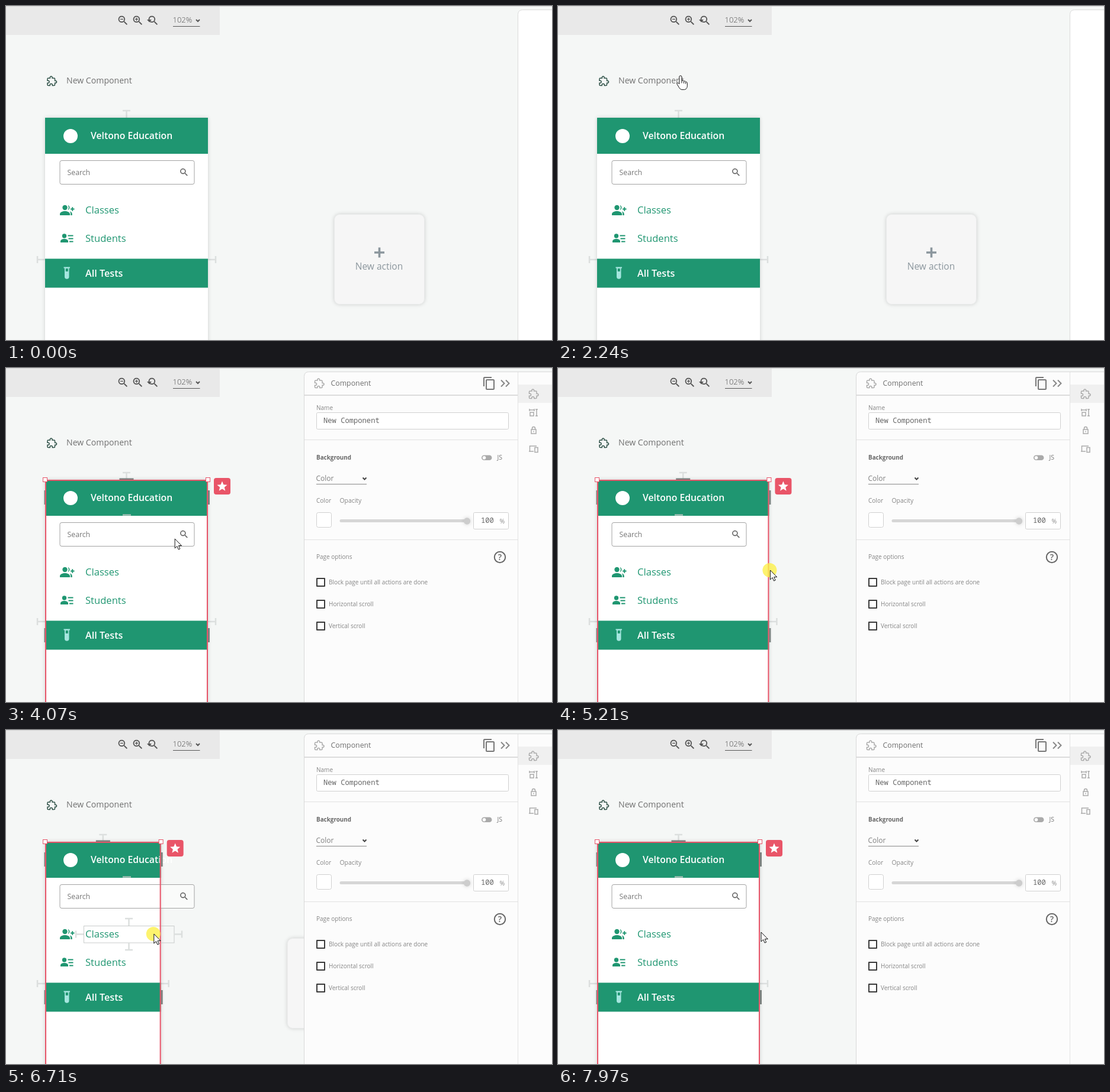
An HTML page for the animation above (8000 ms loop, 922x565 px).

```html
<!DOCTYPE html>
<html lang="en">
<head>
<meta charset="utf-8">
<title>Component resize</title>
<style>
html, body { margin: 0; width: 100%; height: 100%; overflow: hidden; background: #f5f7f6; }
svg { display: block; width: 922px; height: 565px; font-family: "Open Sans", sans-serif; }
.mono { font-family: "Noto Sans Mono", monospace; }
.line { fill: none; stroke: currentColor; }
.guide { fill: none; stroke: #dcdfde; stroke-width: 2.5; }
.rule { stroke: #e2e2e2; }
.box { fill: #fff; stroke: #d0d0d0; }
.green { fill: #1f9671; }
.label { font-size: 10px; font-weight: 500; fill: #858585; }
.menu { font-size: 16.6px; }
.shade { filter: drop-shadow(0 0 3px rgba(0, 0, 0, .16)); }
</style>
</head>
<body>
<svg viewBox="0 0 922 565">
  <defs>
    <path id="glass" d="M15.5 14h-.79l-.28-.27A6.5 6.5 0 1 0 13.73 14.43l.27.28v.79l5 4.99L20.49 19zM9.5 14a4.5 4.5 0 1 1 0-9 4.5 4.5 0 0 1 0 9z" fill-rule="evenodd"/>
    <path id="puzzle" class="line" stroke-width="2" d="M20.5 11H19V7c0-1.1-.9-2-2-2h-4V3.5a2.5 2.5 0 0 0-5 0V5H4c-1.1 0-2 .9-2 2v3.8h1.5a2.7 2.7 0 0 1 0 5.4H2V20c0 1.1.9 2 2 2h3.8v-1.5a2.7 2.7 0 0 1 5.4 0V22H17c1.1 0 2-.9 2-2v-4h1.5a2.5 2.5 0 0 0 0-5z"/>
    <path id="chevron" class="line" stroke-width="2" d="M-3-1.5 0 1.5 3-1.5"/>
  </defs>
  <rect width="922" height="565" fill="#f5f7f6"/>
  <rect width="361" height="49" fill="#e9e9e9"/>
  <path d="M0 .5H922" stroke="#d6d6d6"/>

  <g fill="#555" color="#555">
    <use href="#glass" transform="translate(187 14) scale(.88)"/>
    <use href="#glass" transform="translate(212 14) scale(.88)"/>
    <use href="#glass" transform="translate(238 14) scale(.88)"/>
    <path class="line" stroke-width="1.4" d="M193 22.4h5M218 22.4h5m-2.5-2.5v5"/>
    <path d="M238 23h8l-4 4.5z"/>
    <use href="#chevron" transform="translate(324 24.5)"/>
    <path class="line" d="M282 34.5H327.500"/>
    <text x="281.500" y="28" font-size="13" font-weight="300">102%</text>
  </g>

  <use href="#puzzle" color="#2c4f45" transform="translate(68.500 118.300) scale(.74)"/>
  <text x="102" y="131" font-size="14.1" fill="#707070">New Component</text>

  <g id="card">
    <rect class="shade" x="554.500" y="352.500" width="152" height="152" rx="9" fill="#f6f6f6" stroke="#e9eaea"/>
    <path d="M622 417h17m-8.500-8.500v17" stroke="#8b969d" stroke-width="3.6"/>
    <text x="630" y="446" font-size="15.500" font-weight="500" text-anchor="middle" fill="#8b969d">New action</text>
  </g>

  <path id="frameGuide" class="guide"/>
  <rect id="page" class="shade" x="66" y="189" height="400" fill="#fff"/>
  <rect id="header" class="green" x="66" y="189" height="61"/>
  <rect id="active" class="green" x="66" y="427.500" height="49"/>
  <circle cx="109" cy="220" r="12" fill="#fff"/>
  <text x="143" y="225" font-size="15.750" font-weight="600" fill="#fff">Veltono Education</text>
  <rect x="91" y="261.500" width="227" height="40" rx="3" fill="#fff" fill-opacity=".5" stroke="#a3a3a3"/>
  <text x="103.500" y="286" font-size="12.300" fill="#777">Search</text>
  <use href="#glass" fill="#555" transform="translate(292 272.700) scale(.72)"/>

  <g class="green" color="#1f9671">
    <circle cx="99.500" cy="341" r="4.200"/>
    <path d="M91 354v-2c0-3.500 5-5 8.500-5s8.500 1.500 8.500 5v2zM104.500 337a4.200 4.200 0 0 1 0 8 7 7 0 0 0 0-8zM107.500 347.300c2.500.8 4.200 2.200 4.200 4.700v2h-2.500v-2c0-2-.5-3.500-1.700-4.700z"/>
    <path class="line" stroke-width="2" d="M109 343.500h6.500m-3.250-3.250v6.500"/>
    <circle cx="98.500" cy="389" r="3.700"/>
    <path d="M92 400v-2c0-2.700 3.500-4 6.500-4s6.500 1.300 6.500 4v2z"/>
    <path class="line" stroke-width="2" d="M104.500 388.500h9m-8 5h8m-6.500 5h6.500"/>
    <text class="menu" x="134" y="351">Classes</text>
    <text class="menu" x="134" y="399">Students</text>
  </g>
  <path d="M97.500 441.500h10.500v2h-1.500v15a3.800 3.800 0 0 1-7.500 0v-15h-1.500z" fill="#a5e6df"/>
  <path d="M100.800 444h4v5h-4z" fill="#1f9671"/>
  <text x="134" y="458" font-size="16.200" font-weight="600" fill="#fff">All Tests</text>
  <path id="tick" d="M197 248.500h14" stroke="#b9c4c0" stroke-width="2"/>
  <g id="hover"><rect class="line" color="#c9cccb"/><path class="guide"/></g>

  <g id="selection">
    <path id="bars" fill="none" stroke="#7d8280" stroke-width="3"/>
    <path id="outline" fill="none" stroke="#e75468" stroke-width="2"/>
    <rect x="62.500" y="185.500" width="7" height="7" fill="#fff" stroke="#e75468"/>
    <g id="corner">
      <rect x="-3.500" y="185.500" width="7" height="7" fill="#fff" stroke="#e75468"/>
      <rect x="10" y="186" width="28" height="28" rx="4" fill="#e95568"/>
      <path id="star" fill="#fff"/>
    </g>
  </g>

  <path id="rail" d="M864.500 566V14.500q0-8 8-8H930V566z" fill="#fff" stroke="#dadada"/>
  <g id="panel">
    <path d="M503.500 566V14.500q0-8 8-8H930V566z" fill="#fcfcfc" stroke="#d8d8d8"/>
    <path d="M865 28h57v31h-57z" fill="#f0f0f0"/>
    <path class="rule" d="M864.500 7V565M504 121.500H864M504 290.500H864"/>
    <path d="M504 46H864" stroke="#dcdcdc" stroke-width="2"/>
    <use href="#puzzle" color="#aaa" transform="translate(520 17.300) scale(.74)"/>
    <use href="#puzzle" color="#aaa" transform="translate(882 35.300) scale(.74)"/>
    <g class="line" color="#aaa" stroke-width="1.500">
      <path d="M884 71h8m-8-2v4m8-4v4M885 75h6v6h-6zM896 70v11m-2-11h4m-4 11h4"/>
      <path d="M887 104h8v7h-8zM888.500 104v-2a2.500 2.500 0 0 1 5 0v2M891 106.500v2"/>
      <path d="M891 141h-8M884.500 141v-9H896M893 134.500h5v8h-5z"/>
    </g>
    <text x="548.500" y="30" font-size="12.300" font-weight="500" fill="#707070">Component</text>
    <path transform="translate(804 14)" fill="#777" d="M16 1H4c-1.100 0-2 .9-2 2v14h2V3h12V1zm3 4H8c-1.100 0-2 .9-2 2v14c0 1.100.9 2 2 2h11c1.100 0 2-.9 2-2V7c0-1.100-.9-2-2-2zm0 16H8V7h11v14z"/>
    <path class="line" color="#888" stroke-width="2" d="m836 20.500 5.500 5.500-5.500 5.500m8-11 5.500 5.500-5.500 5.500"/>

    <text class="label" x="524" y="71">Name</text>
    <rect class="box" x="524.500" y="75.500" width="324" height="28" rx="2"/>
    <text class="mono" x="536" y="93" font-size="12.150" fill="#666">New Component</text>

    <text x="524" y="155" font-size="9.900" font-weight="700" fill="#666">Background</text>
    <rect x="803" y="147.500" width="17.500" height="8.500" rx="4.250" fill="#aaa"/>
    <circle cx="807.500" cy="151.700" r="2.800" fill="#fff"/>
    <text x="829.500" y="155" font-size="10.500" fill="#777">JS</text>
    <text x="523.500" y="191" font-size="12" fill="#808080">Color</text>
    <use href="#chevron" color="#444" transform="translate(605.500 187)"/>
    <path d="M524 196.500h85" stroke="#888"/>

    <text class="label" x="524" y="228">Color</text>
    <text class="label" x="563.500" y="228" style="font-size:10.400px">Opacity</text>
    <rect class="box" x="524.500" y="244.500" width="25" height="25" rx="3"/>
    <path d="M566 258.500H778" stroke="#d6d6d6" stroke-width="5" stroke-linecap="round"/>
    <circle class="shade" cx="778.500" cy="259" r="5.700" fill="#cdcdcd"/>
    <rect class="box" x="789.500" y="244.500" width="59" height="28" rx="2"/>
    <text class="mono" x="802" y="262" font-size="12.150" fill="#666">100</text>
    <text x="833.500" y="263" font-size="10.500" fill="#888">%</text>

    <text class="label" x="524" y="323">Page options</text>
    <circle cx="834" cy="320" r="9.200" fill="none" stroke="#666" stroke-width="2"/>
    <text x="834" y="325" font-size="14" font-weight="600" text-anchor="middle" fill="#666">?</text>
    <path fill="#fff" stroke="#3a3a3a" stroke-width="2" stroke-linejoin="round" d="M525 356h13v13h-13zM525 393h13v13h-13zM525 430h13v13h-13z"/>
    <text class="label" x="545" y="366">Block page until all actions are done</text>
    <text class="label" x="545" y="403">Horizontal scroll</text>
    <text class="label" x="545" y="440">Vertical scroll</text>
  </g>

  <g id="cursor" fill="#fff" stroke="#111" stroke-linejoin="round">
    <circle id="press" cx="-1" cy="0" r="12" fill="#fdf04a" fill-opacity=".8" stroke="none"/>
    <path id="arrow" d="M0 0v16l3.700-3.500 2.400 5.600 2.600-1.100-2.400-5.400h5z"/>
    <g id="hand">
      <path d="M-2.200 14V2a2 2 0 0 1 4.200 0v6.500c1-1 3.300-.8 3.600.8 1.200-.8 3 0 3.100 1.200 1.200-.5 2.600.3 2.600 1.800v4.500c0 4-2 6.700-6 6.700h-2.500c-3 0-4.600-2-5.800-4.400l-3-5c-.9-1.600 1.200-3 2.400-1.600z"/>
      <path d="M2 8.500v4M5.600 9.500v3.500M8.700 10.700v3" fill="none"/>
    </g>
  </g>
</svg>
<script>
const LOOP = 8000, LEFT = 66, REST = 341;
const el = id => document.getElementById(id);
const ease = {
  inOut: p => p < .5 ? 4 * p ** 3 : 1 - (2 - 2 * p) ** 3 / 2,
  out: p => 1 - (1 - p) ** 2,
  linear: p => p
};

// Rows are [time, values, easing towards this row]; equal values hold still.
const pointer = [
  [1320, [823, 515]], [2120, [207, 118], 'inOut'],
  [2240, [207, 118]], [3020, [259, 267], 'inOut'],
  [3050, [259, 267]], [3420, [115, 115], 'inOut'],
  [3590, [115, 115]], [4390, [343, 348], 'inOut'],
  [4970, [343, 348]], [5210, [358, 342], 'cubicIn'],
  [5740, [467, 345], 'out'], [5890, [467, 345]],
  [6070, [356, 344], 'linear'], [6660, [252, 345], 'out'],
  [6710, [250, 345]], [6900, [231, 344], 'out'],
  [7070, [231, 344]], [7640, [343, 342], 'inOut']
];
const edge = [
  [4970, [341, 341]], [5210, [356, 356], 'cubicIn'],
  [5740, [465, 465], 'out'], [5890, [465, 465]],
  [6070, [403, 382], 'linear'], [6200, [352, 352], 'linear'],
  [6660, [264, 264], 'out'], [6710, [262, 262]],
  [6900, [231, 231], 'out'], [7070, [231, 231]],
  [7640, [343, 343], 'inOut'], [7890, [343, 343]], [7970, [341, 341]]
];
const press = [[4510, [0]], [4670, [1]], [7890, [1]], [7970, [0]]];
ease.cubicIn = p => p ** 2;

function at(track, t) {
  const i = track.findIndex(row => row[0] > t);
  if (i === 0) return track[0][1];
  if (i < 0) return track[track.length - 1][1];
  const [t0, from] = track[i - 1], [t1, to, name = 'linear'] = track[i];
  const p = ease[name]((t - t0) / (t1 - t0));
  return from.map((v, k) => v + (to[k] - v) * p);
}

const set = (id, name, value) => el(id).setAttribute(name, value);
const show = (id, on) => el(id).style.display = on ? '' : 'none';
const inside = (x, y, [bx, by, w, h]) => x >= bx && x <= bx + w && y >= by && y <= by + h;

function guides(x, y, w, h, bottom = true) {
  const cx = x + w / 2, cy = y + h / 2, r = x + w, b = y + h;
  return `M${x} ${cy}h-13m0-6v12M${r} ${cy}h13m0-6v12M${cx} ${y}v-12m-6.500 0h13`
    + (bottom ? `M${cx} ${b}v12m-6.500 0h13` : '');
}

function hoverBox(t, x, y) {
  const boxes = t > 2120 && t < 3590 ? [[66, 189, 275, 60], [91, 261, 227, 40]]
    : t > 5890 && t < 7640 ? [[131, 331, 153, 29]] : [];
  return boxes.find(box => inside(x, y, box));
}

function draw(t) {
  const [x, y] = at(pointer, t), [right, body] = at(edge, t);
  const selected = t >= 3630, width = right - LEFT, mid = LEFT + width / 2;

  set('page', 'width', body - LEFT);
  set('header', 'width', width);
  set('active', 'width', width);
  set('card', 'transform', `translate(${right - REST} 0)`);
  set('frameGuide', 'd', guides(LEFT, 189, width, 480, false));
  show('tick', t >= 3050);

  show('selection', selected);
  set('outline', 'd', `M67 566V190H${right - 1}V566`);
  const trail = right - body > 12
    ? `M${body} 207v24m0-12H${right}M${body} 440v24m0-12H${right}` : '';
  set('bars', 'd', `M66 207v24m0 209v24M${right + 1.5} 207v24m0 209v24M${mid - 12} 188h24` + trail);
  set('corner', 'transform', `translate(${right} 0)`);
  show('panel', selected);

  const box = hoverBox(t, x, y);
  show('hover', box);
  if (box) {
    const [frame, marks] = el('hover').children;
    ['x', 'y', 'width', 'height'].forEach((name, i) =>
      frame.setAttribute(name, box[i] + (i < 2 ? .5 : -.5)));
    marks.setAttribute('d', guides(...box));
  }

  show('cursor', t >= 1320);
  set('cursor', 'transform', `translate(${x} ${y})`);
  set('press', 'opacity', at(press, t)[0]);
  const hand = t < 3630 && (t > 2120 || inside(x, y, [554, 352, 153, 153]) || inside(x, y, [66, 114, 150, 26]));
  show('hand', hand);
  show('arrow', !hand);
}

set('star', 'd', 'M' + Array.from({ length: 10 }, (_, i) => {
  const r = i % 2 ? 4 : 9, a = i * Math.PI / 5;
  return `${24 + r * Math.sin(a)} ${200.5 - r * Math.cos(a)}`;
}).join('L') + 'z');

const start = performance.now();
function tick() {
  draw((performance.now() - start) % LOOP);
  requestAnimationFrame(tick);
}
tick();
</script>
</body>
</html>
```
